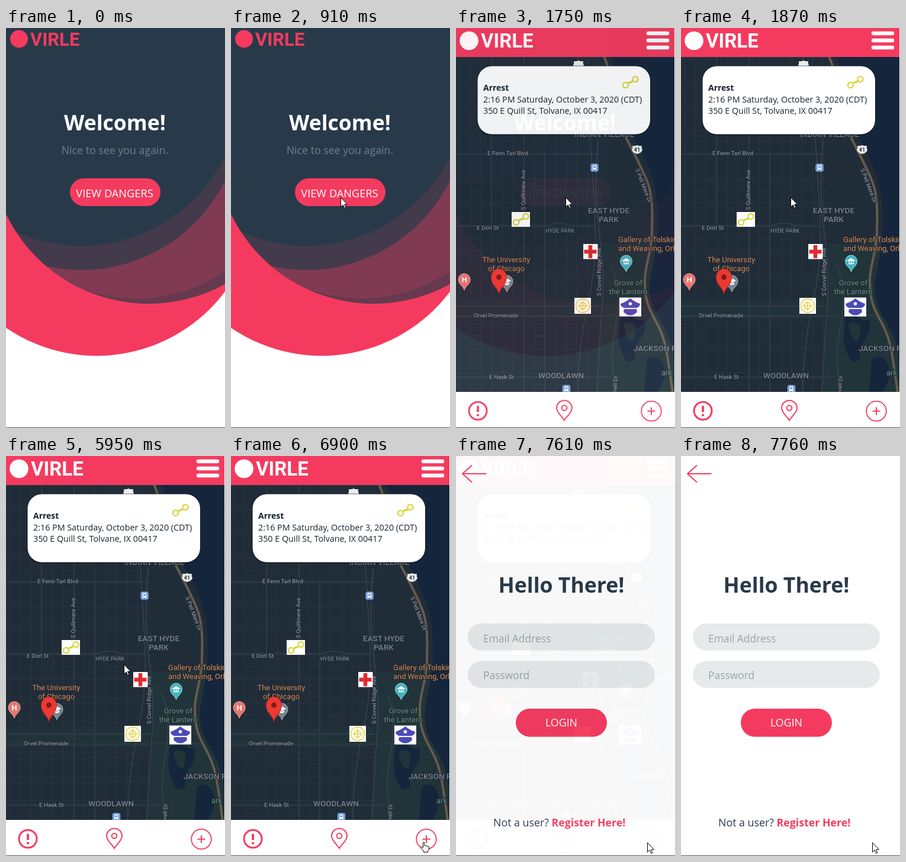
These frames come from a looping animation (370x676 px, 8000 ms). An HTML page:

```html
<!DOCTYPE html>
<html lang="en">
<head>
<meta charset="utf-8">
<title>Danger map app</title>
<style>
  html, body { margin: 0; width: 100%; height: 100%; overflow: hidden; background: #fff; }
  svg { display: block; width: 100%; height: 100%; }
  text { font-family: "Open Sans", "Noto Sans", sans-serif; fill: #283a4a; }
  .mid { text-anchor: middle; }
  .title { font-size: 35.6px; font-weight: 700; }
  .body { font-size: 17.8px; }
  .button { font-size: 18.2px; fill: #fff; }
  .hint { font-size: 17.4px; fill: #9ca2a5; }
  .card { font-size: 14.3px; fill: #14232f; }
  .brand { font: 700 33px Roboto, sans-serif; }
  .red { fill: #f43b5f; }
  .white { fill: #fff; }
  .line { fill: none; stroke: #f43b5f; stroke-width: 2; }

  .map text { font-family: Roboto, "Noto Sans", sans-serif; paint-order: stroke; stroke: #1c2835; stroke-width: 2px; }
  .map .street { font-size: 9.8px; fill: #a6a8aa; }
  .map .area { font-size: 13.5px; font-weight: 500; fill: #7c8288; }
  .map .place { font-size: 12.9px; fill: #dc8950; }
  .map .park { font-size: 12.9px; fill: #69967a; }
  .map .plain { stroke: none; }

  .screen, .pointer { animation: 8s step-end infinite; }
  #map { animation-name: showMap; }
  #login { animation-name: showLogin; }
  #arrow { animation-name: moveArrow; }
  #hand { animation-name: moveHand; }

  @keyframes showMap {
    0% { opacity: 0; }
    20% { opacity: .5; }
    21.875% { opacity: .94; }
    23.375%, 100% { opacity: 1; }
  }
  @keyframes showLogin {
    0% { opacity: 0; }
    93.625% { opacity: .5; }
    95.125% { opacity: .97; }
    97%, 100% { opacity: 1; }
  }
  @keyframes moveArrow {
    0% { transform: translate(-50px, -50px); }
    6.25% { transform: translate(61px, 341px); }
    8.125% { transform: translate(146px, 314px); }
    9.875% { transform: translate(173px, 297px); }
    11.375% { transform: translate(185px, 286px); }
    74.375% { transform: translate(199px, 352px); }
    75.875% { transform: translate(219px, 423px); }
    77.75% { transform: translate(249px, 523px); }
    79.5% { transform: translate(271px, 568px); }
    81% { transform: translate(290px, 610px); }
    82.5% { transform: translate(305px, 641px); }
    84.375% { transform: translate(-50px, -50px); }
    93.625%, 100% { transform: translate(323px, 653px); }
  }
  @keyframes moveHand {
    0% { transform: translate(-50px, -50px); }
    84.375% { transform: translate(314px, 651px); }
    86.25% { transform: translate(319px, 652px); }
    93.625%, 100% { transform: translate(-50px, -50px); }
  }
</style>
</head>
<body>
<svg viewBox="0 0 370 676">
  <defs>
    <clipPath id="dome"><path d="M0 0H370V199H0Z"/><circle cx="241" cy="199" r="267"/></clipPath>
    <clipPath id="mapArea"><path d="M0 48H370V616H0Z"/></clipPath>
    <pattern id="blocks" width="36" height="82" patternUnits="userSpaceOnUse" x="6" y="8">
      <path d="M.5 0V82M18.5 0V82M0 .5H36M0 41.5H36M18 20.5H36" fill="none" stroke="#293642"/>
    </pattern>
    <g id="cuffs" fill="none" stroke="#d9d53a" stroke-width="2.200">
      <circle cx="-8" cy="5" r="4.600"/><circle cx="8.500" cy="-5" r="4.600"/>
      <path d="M-4 3 -1 0 2 0 4.500-3" stroke-width="2.800"/>
    </g>
    <path id="drop" d="M0 0C-2-7-10-10-10-18A10 10 0 0 1 10-18C10-10 2-7 0 0Z"/>
    <g id="bus">
      <rect x="-6" y="-6" width="12" height="12" rx="2" fill="#4c86e0" stroke="#b9d0f3"/>
      <path d="M-3-4H3V3H-3ZM-3 3V5M3 3V5" fill="#fff" stroke="#fff"/>
      <path d="M-2-2.500H2V0H-2Z" fill="#4c86e0"/>
    </g>
    <path id="shield" d="M-8-6Q-4-5 0-7 4-5 8-6 7-2 9 1 8 6 0 8-8 6-9 1-7-2-8-6Z" fill="#eceeee"/>
  </defs>

  <g id="welcome">
    <rect width="370" height="676" fill="#fff"/>
    <circle class="red" cx="153" cy="283" r="271"/>
    <g clip-path="url(#dome)">
      <rect width="370" height="676" fill="#67394f"/>
      <circle cx="220" cy="190" r="267" fill="#803b53"/>
      <circle cx="127" cy="138" r="271" fill="#433a4b"/>
      <circle cx="127" cy="97" r="271" fill="#283a4a"/>
    </g>
    <circle class="red" cx="22" cy="18.500" r="15"/>
    <text class="brand red" x="41" y="30" style="font-size:31px">VIRLE</text>
    <text class="title mid white" x="184" y="173">Welcome!</text>
    <text class="body mid" x="184" y="213" style="fill:#71808b">Nice to see you again.</text>
    <rect class="red" x="108" y="254" width="153" height="47" rx="23.500"/>
    <text class="button mid" x="183.500" y="286">VIEW DANGERS</text>
  </g>

  <g id="map" class="screen">
    <g class="map" clip-path="url(#mapArea)">
      <rect y="48" width="370" height="568" fill="#202d39"/>
      <rect y="48" width="250" height="568" fill="url(#blocks)"/>
      <path d="M0 462H242V491H0Z" fill="#21333a"/>
      <path d="M248 364H303L340 345V430L370 510V616H240L248 480Z" fill="#21343a"/>
      <path d="M262 48C280 100 280 150 300 186S336 250 340 296 338 372 333 400 324 440 331 464 352 500 361 526 370 575 370 600V48Z" fill="#15253b"/>
      <path d="M278 488Q288 480 300 489T318 492Q322 512 311 526T303 559Q291 569 285 558T276 535 278 488ZM322 560Q340 548 349 568T340 616H318Z" fill="#15253b"/>
      <path d="M283 500Q292 494 304 503L300 528Q287 530 283 500Z" fill="#21343a"/>
      <g fill="none" stroke="#303c47" stroke-width="1.800">
        <path d="M0 213H240M0 334H155Q172 326 194 334H236M0 470H245M0 487H248Q290 482 330 487M0 590H262M115 48V616M60 48V334M150 213V616"/>
        <path d="M240 190Q232 270 242 345T246 480L238 616M270 616Q258 560 270 500T262 400" stroke-width="2.600"/>
        <path d="M155 334Q175 344 195 334"/>
      </g>
      <path d="M206 48Q222 120 227 190T235 330 222 470 206 616" fill="none" stroke="#37424b" stroke-width="1.500"/>
      <path d="M250 48C276 110 274 160 288 187S316 240 324 262 332 310 331 346 319 400 319 428 324 470 334 489 352 520 358 560 364 600 366 616" fill="none" stroke="#675b4b" stroke-width="4"/>

      <use href="#shield" x="207" y="62"/>
      <use href="#shield" x="306" y="205"/>
      <text class="plain mid" x="306" y="208.500" style="font-size:9px;font-weight:700;fill:#333">41</text>
      <use href="#bus" x="234" y="236"/>
      <use href="#bus" x="186.500" y="610"/>

      <text class="area" x="200" y="184">INDIAN VILLAGE</text>
      <text class="area mid" x="258" y="313">EAST HYDE</text>
      <text class="area mid" x="258" y="328">PARK</text>
      <text class="area" x="139" y="592">WOODLAWN</text>
      <text class="area" x="300" y="546">JACKSON PARK</text>
      <text class="area" x="151" y="346" style="font-size:9.400px">HYDE PARK</text>
      <text class="street" x="53" y="215">E Fenn Tarl Blvd</text>
      <text class="street" x="35" y="341">E Dorl St</text>
      <text class="street" x="30" y="489">Orvel Promenade</text>
      <text class="street" x="56" y="593">E Hask St</text>
      <text class="street" transform="translate(117 308) rotate(-90)">S Quillmere Ave</text>
      <text class="street" transform="translate(245 453) rotate(-90)">S Corvel Ridge Ave</text>
      <text class="street" transform="translate(271 620) rotate(-86)">avell Dr</text>
      <text class="street" transform="translate(303 239) rotate(69)">S Pell Mere Dr</text>
      <text class="place" x="274" y="362">Gallery of Tolskin</text>
      <text class="place" x="274" y="377">and Weaving, Orlby</text>
      <text class="place mid" x="85" y="396">The University</text>
      <text class="place mid" x="85" y="411">of Chicago</text>
      <text class="park mid" x="291" y="435">Grove of</text>
      <text class="park mid" x="291" y="450">the Lantern</text>
      <text class="park" x="347" y="587">ark</text>

      <use href="#drop" x="14" y="443" fill="#e5756f" stroke="#f0aaa5"/>
      <text class="plain mid" x="14" y="430" style="font-size:13px;font-weight:700;fill:#fff">H</text>
      <use href="#drop" x="86" y="446" fill="#77858f" stroke="#a4afb6"/>
      <path d="M79 427 86 423 93 427 86 431ZM82 430V433Q86 436 90 433V430L86 432Z" fill="#fff"/>
      <use href="#drop" transform="translate(72.500 448.500) scale(1.300 1.480)" fill="#ea3a32" stroke="#b92a27" stroke-width=".7"/>
      <circle cx="72.500" cy="421" r="4.500" fill="#821b18"/>
      <use href="#drop" x="287.500" y="412" fill="#43b3c2" stroke="#9edbe2"/>
      <path d="M282 393 287.500 389.500 293 393ZM283 398.500H292M284 394V398M287.500 394V398M291 394V398" fill="#fff" stroke="#fff" stroke-width="1.300"/>

      <g fill="#fff">
        <rect x="94" y="311" width="31" height="25"/>
        <rect x="215" y="365" width="24.500" height="25.500"/>
        <rect x="200" y="456" width="28" height="27"/>
        <rect x="276" y="455.500" width="37" height="32"/>
      </g>
      <use href="#cuffs" x="109.500" y="323.500"/>
      <path d="M227 367V389M216.500 378H237.500" stroke="#e02c33" stroke-width="6.500"/>
      <g fill="none" stroke="#e6da66" stroke-width="1.900">
        <circle cx="214" cy="469.500" r="11.500"/><circle cx="214" cy="469.500" r="5.500"/>
        <path d="M214 461V478M205.500 469.500H222.500"/>
      </g>
      <path d="M278 466Q287 463 294.500 457 302 463 311 466 311 471 305 473H284Q278 471 278 466ZM284 475H305L306 480Q294.500 491 283 480Z" fill="#4b4bb8"/>
      <circle cx="294.500" cy="466" r="2.800" fill="#fff"/>
    </g>

    <rect x="35" y="63.500" width="294" height="118" rx="25" fill="#0b161f" opacity=".6"/>
    <rect class="white" x="36.500" y="64.500" width="291.500" height="115" rx="24"/>
    <use href="#cuffs" x="294.500" y="91.500"/>
    <text class="card" x="46" y="106" style="font-size:14px;font-weight:700">Arrest</text>
    <text class="card" x="46" y="126">2:16 PM Saturday, October 3, 2020 (CDT)</text>
    <text class="card" x="46" y="145">350 E Quill St, Tolvane, IX 00417</text>

    <rect class="red" width="370" height="49"/>
    <circle class="white" cx="22" cy="21.500" r="15.800"/>
    <text class="brand white" x="42" y="33">VIRLE</text>
    <path d="M325 9H357M325 21H357M325 33H357" stroke="#fff" stroke-width="6.500" stroke-linecap="round"/>

    <rect class="white" y="615" width="370" height="61"/>
    <rect class="white" x="369" width="1" height="676"/>
    <g class="line">
      <circle cx="37" cy="647" r="15" stroke-width="3"/>
      <path d="M37 638.500V649M37 652.500V656" stroke-width="3.800"/>
      <path d="M183 663C179 656 170 650 170 642A13 12.500 0 0 1 196 642C196 650 187 656 183 663Z"/>
      <circle cx="183" cy="642" r="4.300"/>
      <circle cx="330" cy="647.500" r="16.800" stroke-width="1.800"/>
      <path d="M323.500 647.500H336.500M330 641V654"/>
    </g>
  </g>

  <g id="login" class="screen">
    <rect class="white" width="370" height="676"/>
    <path class="line" d="M51.500 30H11M27 15.500 11 30 27 44.500"/>
    <text class="title mid" x="178" y="231">Hello There!</text>
    <g fill="#e6eaeb">
      <rect x="20" y="283" width="316" height="45.500" rx="22.700"/>
      <rect x="20" y="346.500" width="316" height="45.500" rx="22.700"/>
    </g>
    <text class="hint" x="46" y="315">Email Address</text>
    <text class="hint" x="46" y="377">Password</text>
    <rect class="red" x="101" y="427" width="154" height="47.500" rx="23.700"/>
    <text class="button mid" x="178" y="457" style="font-size:17.800px">LOGIN</text>
    <text class="body" x="63" y="626">Not a user? <tspan class="red" font-weight="700">Register Here!</tspan></text>
  </g>

  <rect y="675" width="370" height="1" fill="#555"/>

  <path id="arrow" class="pointer" d="M.5 .5V16.500L4.200 13 6.700 18.500 9 17.500 6.600 12.100H11.500Z" fill="#fff" stroke="#000"/>
  <path id="hand" class="pointer" d="M5.500 10V2Q5.500 .5 6.700 .5T8 2V6.500Q9.300 5.500 10.500 7 12 6.200 13 7.700 15.500 7 15.500 9.500V12Q15 14.500 13.500 16V17.500H6.500V16L2 10.800Q1 9 2.700 8.500T5.500 10Z" fill="#fff" stroke="#000"/>
</svg>
</body>
</html>
```
